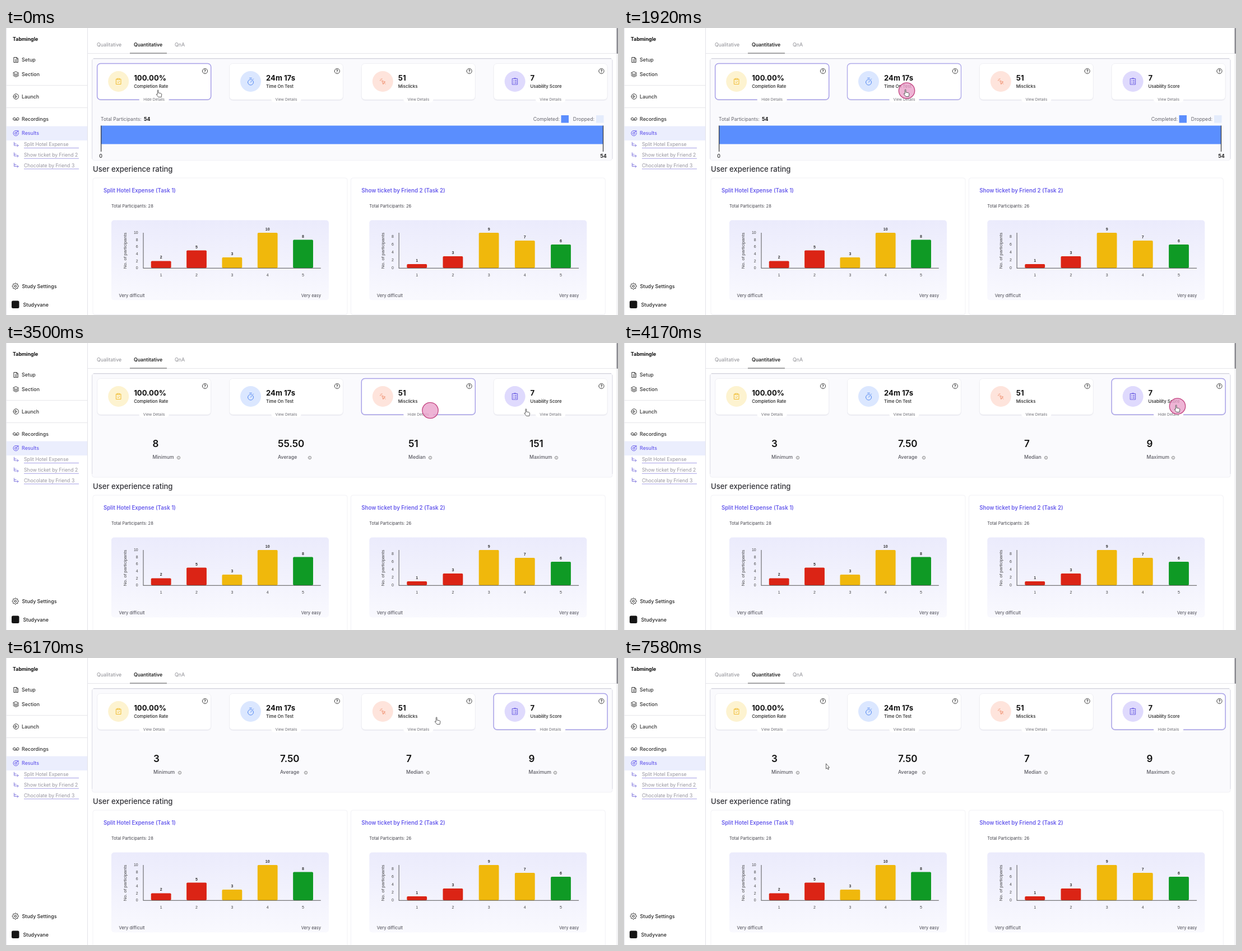
Write an HTML page that moves like this. It is 1092x513 px and loops after 7.75 s.

```html
<!DOCTYPE html>
<html lang="en">
<head>
<meta charset="utf-8">
<title>Study results</title>
<style>
html, body { margin: 0; width: 100%; height: 100%; overflow: hidden; background: #fff; }
svg { display: block; }
text { font-family: Inter, "Open Sans", sans-serif; white-space: pre; }
.plot text { font-family: "Liberation Sans", Arial, sans-serif; }
.icon { fill: none; stroke-linecap: round; stroke-linejoin: round; }
</style>
</head>
<body>
<svg id="stage" width="1092" height="513" viewBox="0 0 1092 513"></svg>
<script>
const LOOP = 7750;
const PURPLE = '#675bec';
const cardX = i => 162.7 + 235.8 * i;

// Drawing helpers
const text = (x, y, s, size, fill = '#222', weight = 400, anchor = 'start', extra = '') =>
  `<text x="${x}" y="${y}" font-size="${size}" fill="${fill}" font-weight="${weight}" text-anchor="${anchor}" ${extra}>${s}</text>`;
const rect = (x, y, w, h, fill, r = 0, extra = '') =>
  `<rect x="${x}" y="${y}" width="${w}" height="${h}" rx="${r}" fill="${fill}" ${extra}/>`;
const line = (x1, y1, x2, y2, color, w = 1) =>
  `<path d="M${x1} ${y1}L${x2} ${y2}" stroke="${color}" stroke-width="${w}"/>`;
const icon = (x, y, d, color = '#333', w = 1) =>
  `<path class="icon" transform="translate(${x} ${y})" d="${d}" stroke="${color}" stroke-width="${w}"/>`;
const ring = r => `M${-r} 0a${r} ${r} 0 1 0 ${2 * r} 0a${r} ${r} 0 1 0 ${-2 * r} 0`;

function sidebar() {
  const items = [
    [57, 'Setup', 'M-3.5-4.5H1.5L3.5-2.5V4.5H-3.5ZM1-4.5V-2H3.5M-1.5 0H1.5M-1.5 2.3H1.5'],
    [82.5, 'Section', 'M0-4.5L4.8-2L0 .5L-4.8-2ZM-4.8 .3L0 2.7L4.8 .3M-4.8 2.5L0 4.9L4.8 2.5'],
    [122.5, 'Launch', ring(4.7) + 'M-1.3-2L2 0L-1.3 2Z'],
    [162.5, 'Recordings', 'M-5.2 0a2.2 2.2 0 1 0 4.4 0a2.2 2.2 0 1 0-4.4 0M.8 0a2.2 2.2 0 1 0 4.4 0a2.2 2.2 0 1 0-4.4 0M-3 2.2H3'],
    [188, 'Results', 'M2-4.2A4.7 4.7 0 1 0 4.5-1M.8-1.7A2 2 0 1 0 1.9 .3M0 0L4.5-4.3M3-4.8V-3H4.8'],
  ];
  const links = ['Split Hotel Expense', 'Show ticket by Friend 2', 'Chocolate by Friend 3'];
  let out = rect(0, 175.5, 145, 25.5, '#ebeefd') + line(.5, 0, .5, 513, '#e6e6ea') +
    line(145.5, 0, 145.5, 513, '#e3e3e8') + line(0, 102.5, 145, 102.5, '#e6e6ea') +
    line(0, 142.5, 145, 142.5, '#e6e6ea') + text(12, 23, 'Tabmingle', 8.9, '#111', 700);
  for (const [y, name, d] of items) {
    const color = name == 'Results' ? PURPLE : '#333';
    out += icon(17.8, y, d, color) + text(28, y + 3.2, name, 8.9, color, 450);
  }
  links.forEach((name, i) => {
    const y = 208.1 + 18.7 * i;
    out += icon(18, y, 'M-3.5-4V2H4M2 0L4 2L2 4M-3.5-1H0', '#7a70dc', .9) +
      text(32, y + 3, name, 8.7, '#96949f') + line(32, y + 6.4, 130, y + 6.4, '#9a93e2', .9);
  });
  const gear = Array.from({length: 48}, (_, i) => {
    const a = i * Math.PI / 24, r = 4.9 + .8 * Math.cos(8 * a);
    return `${i ? 'L' : 'M'}${(r * Math.cos(a)).toFixed(1)} ${(r * Math.sin(a)).toFixed(1)}`;
  }).join('') + 'Z';
  return out + icon(16.8, 461.5, gear + ring(1.8), '#222') +
    text(28.5, 464.8, 'Study Settings', 8.9, '#222', 550) +
    rect(10, 487.5, 13.5, 13.5, '#151515', 2.5) + text(30.5, 497.5, 'Studyvane', 8.9, '#222', 450);
}

function tabs() {
  return line(146, 45.5, 1089, 45.5, '#e6e6ea') + line(221, 45, 287, 45, '#555') +
    text(162, 33, 'Qualitative', 8.85, '#8c8c92') +
    text(228, 33, 'Quantitative', 8.7, '#222', 600) +
    text(301, 33, 'QnA', 8.85, '#8c8c92') +
    rect(1089, 0, 3, 513, '#f3f3f5') + rect(1089.5, 0, 2.5, 46, '#8b8b91', 1);
}

function cards() {
  const data = [
    ['100.00%', 'Completion Rate', '#fdf3d0', '#f0b929',
      'M-2-4.2H-4.3V5H4.3V-4.2H2M-2-5.2H2V-3.2H-2ZM-1.8 .9L-.4 2.2L2 -.4'],
    ['24m 17s', 'Time On Test', '#dbe7ff', '#4a82f0',
      'M-5 1.5a5 5 0 1 0 10 0a5 5 0 1 0-10 0M0 1.5L2-.8M-1.8-6H1.8M4-3.5L5-4.5'],
    ['51', 'Misclicks', '#fee4dc', '#f0906f',
      'M-1.2-1.2L4.6 1L1.9 2.1L.8 4.8ZM2.3 2.5L4.5 4.7M-1.7-5V-3.7M-5-1.7H-3.7M-4.2-4.2L-3.2-3.2'],
    ['7', 'Usability Score', '#dfdafd', '#6355e0',
      'M-4.5-5H4.5V5.5H-4.5ZM-1.5-5.7H1.5M-2.6-2H-2.2M0-2H2.6M-2.6 .5H-2.2M0 .5H2.6M-2.6 3H-2.2M0 3H2.6'],
  ];
  return data.map(([value, label, tint, ink, d], i) => {
    const x = cardX(i);
    return rect(x - .5, 64, 204, 66, '#e4e4ec', 7, 'opacity=".55"') +
      rect(x, 63.5, 203, 64.5, '#fff', 6, 'class="card"') +
      `<circle cx="${x + 38}" cy="95.5" r="18.5" fill="${tint}"/>` + icon(x + 38, 95.5, d, ink, .95) +
      text(x + 65.5, 94.3, value, 13.1, '#111', 700) + text(x + 65.5, 107, label, 7.75, '#222', 500) +
      icon(x + 192.3, 77, ring(4.6), '#333', .9) +
      text(x + 192.3, 79.6, '?', 7.2, '#222', 600, 'middle') +
      rect(x + 75, 122, 53, 11, '#fff', 5) +
      text(x + 101.5, 129.8, '', 6.7, '#6d6d75', 400, 'middle', 'class="toggle"');
  }).join('');
}

function completion() {
  return text(169, 165.7, 'Total Participants:', 8.6, '#67676f') + text(246, 165.7, '54', 8.8, '#111', 700) +
    text(988, 165.7, 'Completed:', 8.7, '#67676f', 400, 'end') + rect(990.5, 156, 13.5, 13.5, '#5b8dfd') +
    text(1050, 165.7, 'Dropped:', 8.7, '#67676f', 400, 'end') + rect(1053, 156, 13.5, 13.5, '#e4ecfc') +
    rect(169.5, 174.5, 896.5, 33, '#5a8efe') +
    line(169.7, 174.5, 169.7, 221, '#333', 1.2) + line(1065.5, 174.5, 1065.5, 221, '#333', 1.2) +
    text(169, 232.3, '0', 8.9, '#222', 500, 'middle') + text(1066, 232.3, '54', 8.9, '#222', 700, 'middle');
}

function stats(values, xs, marks) {
  return ['Minimum', 'Average', 'Median', 'Maximum'].map((name, i) =>
    text(xs[i], 186.2, values[i], 17, '#111', 600) + text(xs[i], 207, name, 8.7, '#5b5b63', 450) +
    icon(marks[i], 205, ring(2.7) + 'M0-.1V1.1M0-1.2V-1.1', '#666', .7)).join('');
}

function chart(x, title, total, values, axis, step, unit) {
  const colors = ['#db2415', '#db2415', '#f0b80c', '#f0b80c', '#0f9a25'];
  let out = rect(x, 268, 454, 244.5, '#fff', 4, 'stroke="#f1f1f5"') +
    text(x + 19, 294, title, 9.7, PURPLE, 600) +
    text(x + 33, 320.9, 'Total Participants: ' + total, 7.5, '#44444c') +
    rect(x + 33, 343.5, 388, 143, 'url(#fade)', 5) + '<g class="plot">' +
    text(0, 0, 'No. of participants', 8, '#444', 400, 'middle', `transform="translate(${x + 59.5} 398) rotate(-90)"`);
  for (let n = 0; n <= Math.max(...values); n += 2)
    out += text(axis - 9.3, 431.2 - n * unit, n, 6.9, '#444', 400, 'end');
  values.forEach((n, i) => {
    const cx = axis + step * (i + .5), h = n * unit;
    out += rect(cx - 17.9, 429 - h, 35.8, h, colors[i], 1.8) +
      text(cx, 425 - h, n, 7, '#333', 700, 'middle') + text(cx, 444.4, i + 1, 7, '#444', 400, 'middle');
  });
  return out + line(axis, 366, axis, 429, '#555') + line(axis - .5, 429.3, axis + step * 5, 429.3, '#555') + '</g>' +
    text(x + 46.5, 480.5, 'Very difficult', 7.7, '#44444c') +
    text(x + 407, 480.5, 'Very easy', 7.5, '#44444c', 400, 'end');
}

const stage = document.getElementById('stage');
stage.innerHTML =
  `<defs><linearGradient id="fade" x2="0" y2="1"><stop stop-color="#ebebfc"/><stop offset="1" stop-color="#f9f9fe"/></linearGradient></defs>` +
  sidebar() + tabs() +
  rect(153.5, 54.5, 928.5, 182, '#fafafd', 4, 'id="panel" stroke="#f0f0f5"') +
  line(156, 54.7, 1080, 54.7, '#cfcfd9', 1.3) + line(153.7, 57, 153.7, 234, '#dcdce5') + line(1082, 57, 1082, 234, '#dcdce5') +
  cards() +
  `<g class="detail">${completion()}</g>` +
  `<g class="detail">${stats(['18m 23s', '22m 36s', '24m 17s', '31m 16s'], [247, 471.5, 698, 923], [324, 551, 776, 997])}</g>` +
  `<g class="detail">${stats(['8', '55.50', '51', '151'], [261.5, 485, 718, 934], [308, 542, 757, 982])}</g>` +
  `<g class="detail">${stats(['3', '7.50', '7', '9'], [263, 489, 714, 932.5], [310, 535, 753, 980])}</g>` +
  `<g id="lower">` + text(155, 257, 'User experience rating', 13.1, '#303036', 550) +
  chart(155, 'Split Hotel Expense (Task 1)', 28, [2, 5, 3, 10, 8], 245, 63.35, 6.3) +
  chart(615.3, 'Show ticket by Friend 2 (Task 2)', 26, [1, 3, 9, 7, 6], 701.1, 64.2, 7) + `</g>` +
  `<circle id="click" r="14.2" fill="#eaa3cc" fill-opacity=".82" stroke="#c2427f" stroke-width="1.3"/>` +
  `<g id="cursor" fill="#fff" stroke="#444" stroke-width=".85" stroke-linejoin="round">
    <path id="hand" d="M-2.7 1.5V-5.6Q-1.9-6.9-1-5.6V-1L3.6-.1Q5 .5 4.8 2L4.1 6.5H-1.1L-4.8 1.8Q-4.6 .4-2.7 1.5Z"/>
    <path id="arrow" d="M-2.5-5.2V4.2L-.4 2.4L1 5.4L2.4 4.8L1.1 1.9H3.6Z"/></g>`;

const $ = id => document.getElementById(id);
const all = name => [...stage.getElementsByClassName(name)];
const cardEls = all('card'), toggles = all('toggle'), details = all('detail');
const show = (el, on) => el.setAttribute('visibility', on ? 'visible' : 'hidden');

// Cursor path: time, x, y, easing towards that point
const linear = u => u, easeIn = u => u * u, easeOut = u => 1 - (1 - u) ** 2, smooth = u => u * u * (3 - 2 * u);
const path = [
  [0, 273, 117, linear], [1150, 273, 117, linear], [1850, 504, 116, smooth],
  [2330, 504, 116, linear], [2580, 751, 130, easeIn], [2680, 757, 124, easeOut],
  [3250, 757, 124, linear], [3500, 929, 124, easeIn], [3670, 987, 117, easeOut],
  [5600, 987, 117, linear], [6170, 771, 112, easeIn], [6420, 530, 112, linear],
  [7250, 363, 185, easeOut], [7580, 363, 194, easeOut], [LOOP, 363, 194, linear],
];
const clicks = [[1850, 504, 116], [3000, 756.5, 124.5], [3900, 987, 117]];
const CLICK_TIME = 670;
const switches = [2000, 3200, 4170];
const HOVER_DELAY = 120;

function cursorAt(t) {
  const i = Math.max(1, path.findIndex(p => p[0] > t));
  const [t0, x0, y0] = path[i - 1], [t1, x1, y1, ease] = path[i];
  const u = ease((Math.max(t, 0) - t0) / (t1 - t0));
  return [x0 + (x1 - x0) * u, y0 + (y1 - y0) * u];
}

// Index of the card under the pointer's tip, or -1
function cardUnder([x, y]) {
  const tipX = x - 2, tipY = y - 7;
  if (tipY < 63 || tipY > 129) return -1;
  return [0, 1, 2, 3].findIndex(i => tipX >= cardX(i) && tipX <= cardX(i) + 203);
}

function draw(t) {
  const active = switches.filter(s => t >= s).length;
  const hovered = cardUnder(cursorAt(t - HOVER_DELAY));
  cardEls.forEach((el, i) => {
    el.setAttribute('stroke', i == active ? '#a8a1e8' : i == hovered ? '#b0aaea' : '#ececf2');
    el.setAttribute('stroke-width', i == active ? 1.5 : i == hovered ? 1.4 : .8);
    toggles[i].textContent = i == active ? 'Hide Details' : 'View Details';
    show(details[i], i == active);
  });
  $('panel').setAttribute('height', active ? 185.5 : 182);
  $('lower').setAttribute('transform', `translate(0 ${active ? 4 : 0})`);

  const pos = cursorAt(t), onCard = cardUnder(pos) >= 0;
  $('cursor').setAttribute('transform', `translate(${pos})`);
  show($('hand'), onCard);
  show($('arrow'), !onCard);

  const click = clicks.find(c => t >= c[0] && t < c[0] + CLICK_TIME);
  show($('click'), click);
  if (click) $('click').setAttribute('transform', `translate(${click[1] + .5} ${click[2] - 4})`);
}

const start = performance.now();
function tick() {
  draw((performance.now() - start) % LOOP);
  requestAnimationFrame(tick);
}
tick();
</script>
</body>
</html>
```
